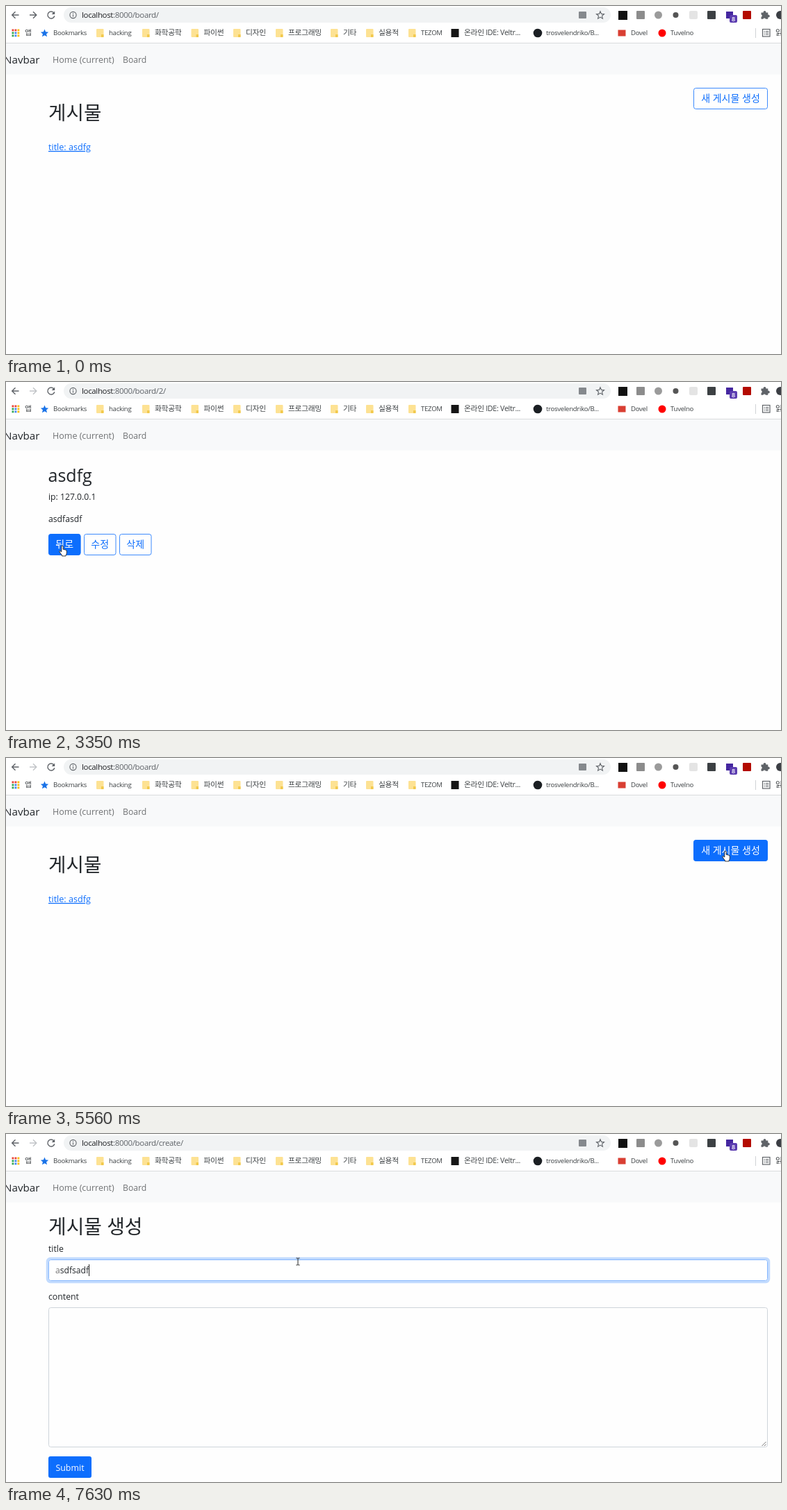
An HTML page for the animation above (8000 ms loop, 1115 by 502 pixels).

```html
<!DOCTYPE html>
<html lang="ko">
<head>
<meta charset="utf-8">
<title>Board</title>
<style>
html, body { margin: 0; width: 100%; height: 100%; overflow: hidden; background: #fefefe; }
svg { display: block; width: 1115px; height: 502px; }
text { font-family: "Open Sans", "Noto Sans CJK KR", "Noto Sans CJK JP", sans-serif; white-space: pre; }
.tight { letter-spacing: -.03em; }
.light { font-weight: 300; }
#menu rect { filter: drop-shadow(0 1px 1.5px #0006); }
</style>
</head>
<body>
<svg id="stage" viewBox="0 0 1115 502"></svg>
<script>
const LOOP = 8000, BLUE = '#0d6efd', INK = '#212529', GREY = '#5f6368';
const BODY = 12.3;

// Hangul is set a little larger than Latin so that both look the same size.
const fontSize = (s, size) => /[가-힣]/.test(s) ? size * 1.12 : size;
const text = (x, y, s, size = BODY, fill = INK, extra = '') =>
  `<text x="${x}" y="${y}" font-size="${fontSize(s, size)}" fill="${fill}" ${extra}>${s}</text>`;
const rect = (x, y, w, h, fill, extra = '') =>
  `<rect x="${x}" y="${y}" width="${w}" height="${h}" fill="${fill}" ${extra}/>`;
const dot = (x, y, r, fill, extra = '') =>
  `<circle cx="${x}" cy="${y}" r="${r}" fill="${fill}" ${extra}/>`;
const line = (d, stroke, width = 1.4, extra = '') =>
  `<path d="${d}" fill="none" stroke="${stroke}" stroke-width="${width}" ${extra}/>`;
const group = (id, ...parts) => `<g id="${id}">${parts.join('')}</g>`;

function starPath(cx, cy, r) {
  const points = Array.from({ length: 10 }, (_, i) => {
    const a = i * Math.PI / 5, d = i % 2 ? r * .45 : r;
    return `${cx + d * Math.sin(a)} ${cy - d * Math.cos(a)}`;
  });
  return `M${points.join('L')}z`;
}

function button(x, y, w, label, hoverId) {
  const box = (fill, color) =>
    rect(x + .5, y + .5, w - 1, 30, fill, `rx="3" stroke="${BLUE}" stroke-width=".8"`) +
    text(x + w / 2, y + 20.2, label, 12.5, color, 'text-anchor="middle" class="light"');
  return box('#fefefe', BLUE) + (hoverId ? group(hoverId, box(BLUE, '#fff')) : '');
}

function toolbar() {
  return rect(0, 0, 1115, 53, '#fff') +
    rect(83, 2, 787, 22, '#f1f3f4', 'rx="11"') +
    line('M18.5 13H9M13.5 8.2L8.7 13l4.8 4.8', GREY) +
    line('M34 13h9.5M39 8.2L43.8 13L39 17.8', GREY, 1.4, 'id="forward"') +
    group('reload', line('M69 10a5 5 0 1 0 .8 4.2', GREY), `<path d="M70.2 7.5v4.6h-4.6z" fill="${GREY}"/>`) +
    group('stop', line('M60.3 8.5l9 9m0-9l-9 9', GREY)) +
    dot(96.5, 13, 4.6, 'none', `stroke="${GREY}" stroke-width="1.1"`) +
    line('M96.5 12.4v3.2M96.5 10.2v1.2', GREY, 1.1) +
    `<text x="109" y="17.2" font-size="11.5" class="tight" fill="#202124">localhost<tspan id="path" fill="${GREY}"></tspan></text>` +
    rect(824, 8, 11, 10, '#85898d', 'id="translate" rx="1"') +
    line(starPath(855, 13.5, 5.8), GREY, 1.1) +
    rect(881, 7, 13, 13, '#111') +
    rect(907, 7, 12, 12, '#8c8c8c', 'rx="1"') +
    dot(938.5, 13, 5.5, '#9b9b9b') +
    dot(963.5, 13, 4, '#555') +
    rect(983, 7, 12, 12, '#e4e4e4', 'rx="2"') +
    rect(1009, 7, 12, 12, '#3c4043', 'rx="1"') +
    rect(1036, 8, 10, 10, '#4527a0') +
    group('badge', rect(1041, 13, 11, 11, '#5b3cb0', 'rx="2"'),
      text(1046.5, 22, '8', 9, '#fff', 'text-anchor="middle" font-weight="600"')) +
    rect(1060, 7, 12, 12, '#b30b00', 'id="reader" rx="1"') +
    `<path d="M1086.5 9.5h3.2a1.9 1.9 0 1 1 3.6 0h3v3.2a1.9 1.9 0 1 1 0 3.6v2.5h-3.4a1.9 1.9 0 0 0-3.6 0h-2.8v-3a1.9 1.9 0 0 0 0-3.6z" fill="${GREY}"/>` +
    dot(1114, 13, 6, '#3b3e44');
}

function bookmarks() {
  const folders = [[148, 'hacking'], [214, '화학공학'], [284.5, '파이썬'], [345, '디자인'],
    [406, '프로그래밍'], [485, '기타'], [536, '실용적'], [597, 'TEZOM']];
  const links = [[27, '앱'], [68, 'Bookmarks'], [659, '온라인 IDE: Veltr...'],
    [777, 'trosvelendriko/B...'], [899, 'Dovel'], [956, 'Tuvelno'], [1107, '읽기 목록']];
  const label = ([x, s]) => text(x, 42.3, s, 9.6, '#3c4043', 'class="tight"');
  const dots = ['#ea4335', '#ea4335', '#fbbc04', '#34a853', '#4285f4', '#fbbc04', '#34a853', '#4285f4', '#fbbc04'];
  return dots.map((c, i) => rect(8.5 + i % 3 * 4, 33.5 + Math.floor(i / 3) * 4, 2.8, 2.8, c)).join('') +
    `<path d="${starPath(55.5, 39.5, 6)}" fill="#1a73e8"/>` +
    folders.map(([x]) => rect(x - 18, 33, 10.5, 12, '#fde293', 'rx="1"') +
      rect(x - 11, 41, 3.5, 4, '#f2c94c')).join('') +
    rect(640.5, 33, 11, 12, '#151515') + dot(765, 39, 6.3, '#1b1f23') +
    rect(880.5, 34.5, 11, 9, '#d93f33') + dot(944, 39, 5.5, '#f00') +
    line('M1078.5 32v14', '#d0d3d6', 1) +
    rect(1088.5, 33.5, 10.5, 10.5, 'none', `stroke="${GREY}" stroke-width="1.2"`) +
    line('M1090.5 36.5h1.3m1 0h4.4M1090.5 38.8h1.3m1 0h4.4M1090.5 41.1h1.3m1 0h4.4', GREY, 1) +
    [...folders, ...links].map(label).join('');
}

const header = () =>
  rect(0, 53, 1115, 45.5, '#f8f9fa') + rect(0, 53, 1115, 1, '#d9dbdd') +
  text(-3, 83.2, 'Navbar', 15.2) +
  text(67, 82, 'Home (current)', 12.5, '#707274') + text(168, 82, 'Board', 12.2, '#707274');

const listPage = () => group('list',
  text(61, 164, '게시물', 24.7, INK, 'class="light"'),
  button(989, 118, 107, '새 게시물 생성', 'newHover'),
  text(61, 208, 'title: asdfg', 12.6, BLUE, 'id="link" text-decoration="underline"'));

const detailPage = () => group('detail',
  text(60.5, 144, 'asdfg', 25), text(61, 170, 'ip: 127.0.0.1', 12.2), text(61, 202, 'asdfasdf', 12.2),
  button(61, 219, 46.5, '뒤로', 'backHover'), button(112, 219, 46.5, '수정'), button(163, 219, 46.5, '삭제'));

const formPage = () => group('form',
  text(61, 144, '게시물 생성', 24.9, INK, 'class="light"'),
  text(61, 170, 'title'), text(61, 239, 'content'),
  rect(59.5, 179.5, 1038, 34, 'none', 'id="ring" rx="4.5" stroke="#c2dbfe" stroke-width="3.5"'),
  rect(61.5, 181.5, 1034, 30, '#fff', 'id="field" rx="3"'),
  `<text x="71" y="201" font-size="12.1" fill="${INK}"><tspan id="first" fill="#777"></tspan><tspan id="rest"></tspan></text>`,
  rect(71, 188, 1, 17, '#222', 'id="caret"'),
  rect(61.5, 250.5, 1034, 201, '#fefefe', 'rx="3" stroke="#ced4da"'),
  line('M1087.5 450l6-6M1091 450l2.5-2.5', '#777', 1),
  rect(61, 465, 62, 31, BLUE, 'rx="3"'), text(92, 485.5, 'Submit', 12.4, '#fff', 'text-anchor="middle"'),
  group('menu'));

const pointer = () => group('cursor',
  dot(0, 0, 9.5, '#ffee22', 'id="click" opacity=".72"'),
  `<path id="arrow" d="M0 0v11l2.6-2.3 1.7 3.8 1.7-.8-1.7-3.6h3.3z" fill="#fff" stroke="#222" stroke-width=".9"/>`,
  `<path id="hand" d="M-1.2.8q1.2-1.6 2.4 0v4.5l3.5.8q1.6.4 1.6 2v2.4q0 2-1.2 3.4v1.1h-5.6v-1l-3.6-5q-.6-1.6 1-1.4l1.9 1.4z" fill="#fff" stroke="#222" stroke-width=".9"/>`,
  line('M-2.5-5h2l.5.5l.5-.5h2M0-4.5v9M-2.5 5h2l.5-.5l.5.5h2', '#222', 1, 'id="beam"'));

stage.innerHTML = header() + toolbar() + bookmarks() + listPage() + detailPage() + formPage() + pointer();
const el = {};
stage.querySelectorAll('[id]').forEach(node => el[node.id] = node);

// Pointer moves: start, end, number of jumps, destination.
const moves = [
  [330, 330, 1, 838, 371], [390, 390, 1, 684, 302], [650, 790, 3, 219, 196],
  [1120, 1260, 3, 109, 197], [1330, 1530, 4, 89, 204], [2320, 2460, 3, 152, 347],
  [2700, 3070, 6, 83, 242], [3140, 3350, 4, 81, 236], [4210, 4410, 4, 202, 241],
  [4480, 4550, 2, 310, 264], [4750, 4890, 3, 814, 196], [5110, 5320, 4, 1035, 134],
  [6040, 6310, 5, 450, 156], [6570, 6770, 4, 420, 184]];

function pointerAt(t) {
  let x = 838, y = 371;
  for (const [from, to, steps, toX, toY] of moves) {
    if (t < from) break;
    const jump = t >= to ? steps : Math.floor((t - from) / (to - from) * (steps - 1)) + 1;
    x += (toX - x) * jump / steps;
    y += (toY - y) * jump / steps;
  }
  return [x, y];
}

const within = (t, ...spans) => spans.some(([a, b]) => t >= a && t < b);
const ramp = (t, from, length) => Math.min(1, Math.max(0, (t - from) / length));
const show = (id, on) => el[id].style.display = on ? '' : 'none';

function drawBrowser(t) {
  const loading = within(t, [1930, 2600], [3810, 4270], [5830, 6180]);
  show('stop', loading);
  show('reload', !loading);
  show('badge', within(t, [0, 1930], [3000, 3810], [4410, 5830], [7400, LOOP]));
  show('translate', !within(t, [3940, 4270]));
  el.reader.setAttribute('fill', loading ? '#a6a6a6' : '#b30b00');
  el.forward.setAttribute('stroke', t < 1930 ? GREY : '#c1c4c7');
  const page = within(t, [2270, 3940]) ? '2/' : t >= 5900 ? 'create/' : '';
  el.path.textContent = ':8000/board/' + page;
}

function drawPages(t) {
  show('list', within(t, [0, 2270], [3940, 5900]));
  show('detail', within(t, [2270, 3940]));
  show('form', t >= 5970);
  el.link.setAttribute('fill', within(t, [1190, 2270]) ? '#0a58ca' : BLUE);
  el.backHover.setAttribute('opacity', ramp(t, 3080, 200));
  el.newHover.setAttribute('opacity', ramp(t, 5250, 150));
}

const suggestions = ['asdf', '게시물1', 'new1', 'abcd', 'title1', '제15회 모란빛 시조 전국 고교 글짓기'];

function drawForm(t) {
  const typed = 'asdfsadf'.slice(0, Math.max(0, Math.floor((t - 7180) / 56)));
  el.first.textContent = typed.slice(0, 1);
  el.rest.textContent = typed.slice(1);
  el.caret.setAttribute('x', 71 + (typed ? el.first.parentNode.getComputedTextLength() : 0));
  show('caret', t >= 7100);
  el.ring.setAttribute('opacity', ramp(t, 7080, 170));
  el.field.setAttribute('stroke', t < 7080 ? '#ced4da' : t < 7180 ? '#b3cdf0' : '#86b7fe');
  const items = t < 7100 ? [] : suggestions.filter(s => s.startsWith(typed));
  el.menu.innerHTML = items.length
    ? rect(60.5, 210.5, 202, 14 + 28.8 * items.length, '#fff', 'rx="2"') +
      items.map((s, i) => text(70, 235 + 28.8 * i, s, 10.1)).join('')
    : '';
}

function drawPointer(t) {
  const [x, y] = pointerAt(t);
  const hand = within(t, [1190, 2270], [2990, 4210], [5250, 5970]), beam = t >= 6760;
  el.cursor.setAttribute('transform', `translate(${x} ${y})`);
  show('cursor', t >= 330);
  show('hand', hand);
  show('beam', beam);
  show('arrow', !hand && !beam);
  show('click', within(t, [1730, 1930], [3610, 3810], [5630, 5830], [7030, 7190]));
}

function frame() {
  const t = performance.now() % LOOP;
  drawBrowser(t);
  drawPages(t);
  drawForm(t);
  drawPointer(t);
  requestAnimationFrame(frame);
}
frame();
</script>
</body>
</html>
```
